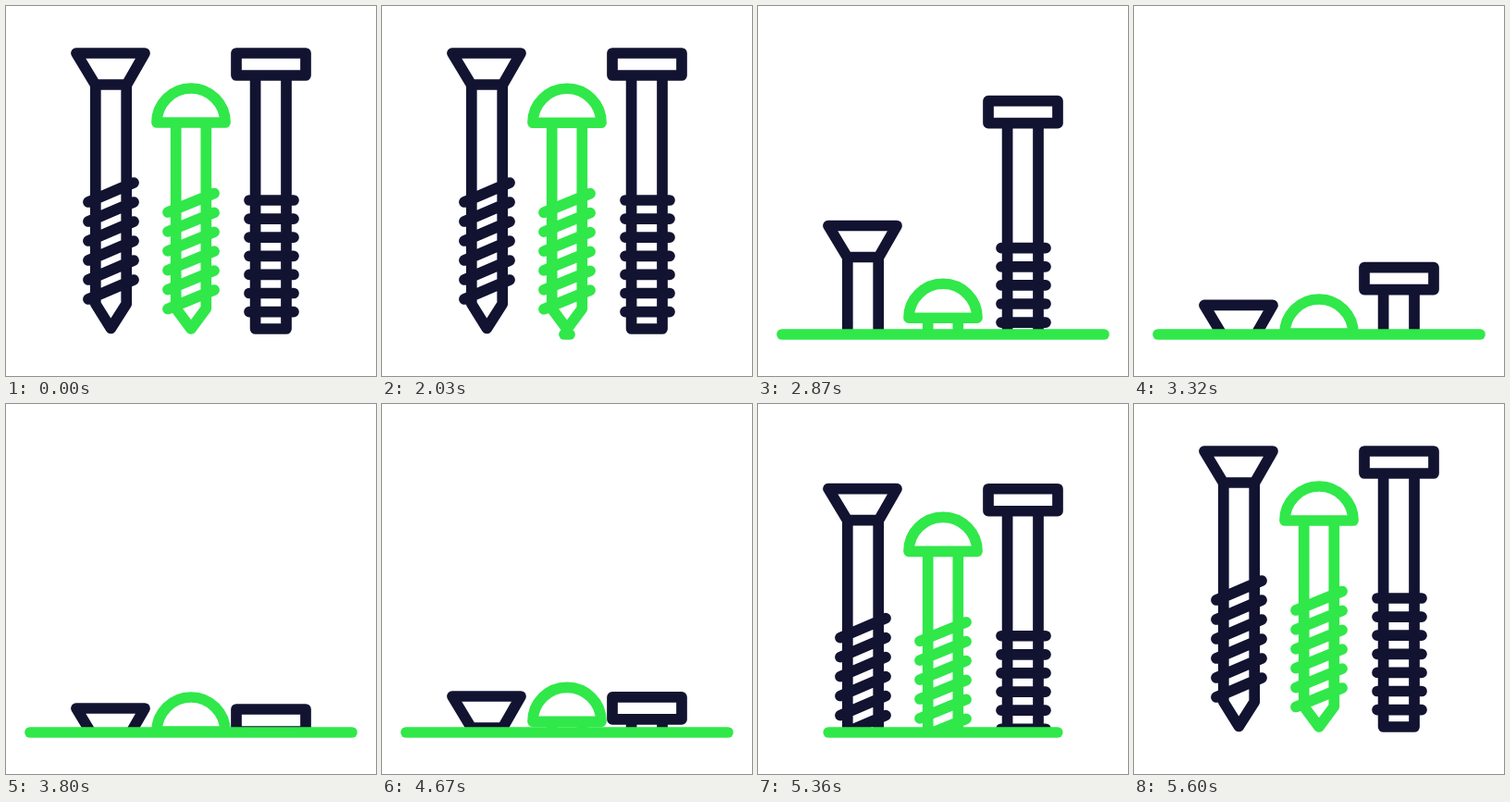
An HTML page that plays this animation: 400 by 400 pixels, repeating every 5.66 s.

```html
<!DOCTYPE html>
<html lang="en">
<head>
<meta charset="utf-8">
<title>Screws</title>
<style>
  html, body { margin: 0; width: 100%; height: 100%; overflow: hidden; background: #fff; }
  svg { display: block; width: 100%; height: 100%; }
  g, path { fill: none; stroke-width: 11.7; stroke-linecap: round; stroke-linejoin: round; }
  .dark { stroke: #121331; }
  .green { stroke: #30e849; }
</style>
</head>
<body>
<svg viewBox="0 0 400 400">
  <clipPath id="above"><rect width="400" height="355"/></clipPath>
  <g clip-path="url(#above)">
    <path id="flat" class="dark"/>
    <path id="bolt" class="dark"/>
    <path id="round" class="green"/>
  </g>
  <path id="ground" class="green"/>
</svg>
<script>
  const LOOP = 5660, STEP = 30;
  const el = id => document.getElementById(id);

  // Repeated thread strokes from (x1, y) to (x2, y - rise)
  const threads = (n, x1, x2, y, gap, rise) =>
    Array.from({ length: n }, (_, i) => `M${x1} ${y + i * gap}L${x2} ${y + i * gap - rise}`).join('');

  el('flat').setAttribute('d',
    'M76 51H150L130.5 85H96.5ZM96.8 85V322L113.3 348.5L130.2 322V85' +
    threads(6, 89, 138, 212, 21, 21));
  el('round').setAttribute('d',
    'M163 126A37 37 0 0 1 237 126ZM183.7 126V327L200 349L216.3 327V126' +
    threads(6, 175, 225, 223, 20.9, 20.5));
  el('bolt').setAttribute('d',
    'M249 51H324V75H249ZM269.6 75V349H303V75' +
    threads(7, 263, 311, 210, 20.1, 0));

  // Cubic bezier easing with flat ends: (x1, 0, x2, 1)
  const ease = (x1, x2) => p => {
    if (p <= 0) return 0;
    if (p >= 1) return 1;
    let lo = 0, hi = 1;
    for (let i = 0; i < 24; i++) {
      const s = (lo + hi) / 2, r = 1 - s;
      if (3 * x1 * s * r * r + 3 * x2 * s * s * r + s * s * s < p) lo = s; else hi = s;
    }
    return lo * lo * (3 - 2 * lo);
  };
  const sink = ease(.333, .333);
  const rise = ease(.66, .667);

  const screws = [
    { node: el('round'), depth: 228, start: 2008 },
    { node: el('flat'), depth: 278, start: 2306 },
    { node: el('bolt'), depth: 279, start: 2606 }
  ];

  function draw(t) {
    const up = rise((t - 4397) / 1200);
    for (const { node, depth, start } of screws) {
      const y = depth * (sink((t - start) / 1200) - up);
      node.setAttribute('transform', `translate(0 ${y.toFixed(2)})`);
    }
    const half = 174 * (sink((t - 1988) / 580) - rise((t - 5120) / 480));
    el('ground').setAttribute('d', half < .5 ? '' : `M${200 - half} 355H${200 + half}`);
  }

  const t0 = performance.now();
  function tick() {
    const t = (performance.now() - t0) % LOOP;
    draw(Math.floor((t + 10) / STEP) * STEP - 10);
    requestAnimationFrame(tick);
  }
  tick();
</script>
</body>
</html>
```
